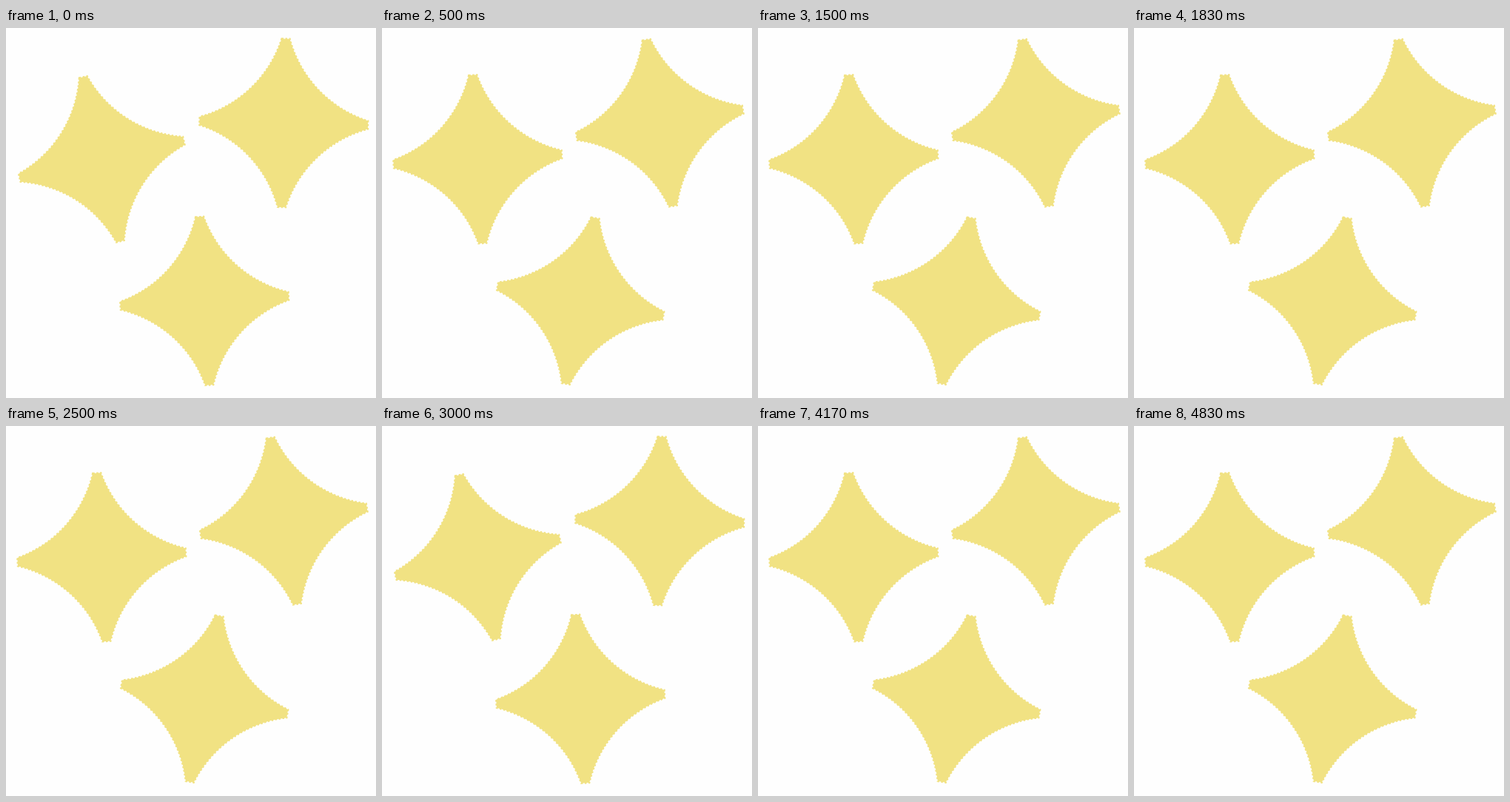
Animation of 500x500 px, one loop 5.01 s. Source, as an HTML page:

```html
<!DOCTYPE html>
<html lang="en">
<head>
<meta charset="utf-8">
<title>Sparkles</title>
<style>
  html, body { margin: 0; width: 100%; height: 100%; overflow: hidden; background: #fefefe; }
  svg { display: block; width: 100%; height: 100%; }
  /* the dashed stroke gives the edge its fine teeth */
  use { fill: #f1e283; stroke: #f1e283; stroke-width: 2.4; stroke-dasharray: 2.5; transform: rotate(var(--a)); }
  .tilt use { transform: rotate(var(--b)); }
</style>
</head>
<body>
<svg id="stage" viewBox="0 0 500 500">
  <defs>
    <!-- four concave arcs joined by short flat tips -->
    <path id="star" d="M-5.5-113.8H5.5A160 160 0 0 0 113.8-5.5V5.5A160 160 0 0 0 5.5 113.8H-5.5A160 160 0 0 0-113.8 5.5V-5.5A160 160 0 0 0-5.5-113.8Z"/>
  </defs>
  <g transform="translate(129.3 177.3)"><use href="#star" style="--a:-12.7deg;--b:-3.3deg"/></g>
  <g transform="translate(375.3 128.3)"><use href="#star" style="--a:1.4deg;--b:-9.1deg"/></g>
  <g transform="translate(268.2 368.8)"><use href="#star" style="--a:-3.3deg;--b:10.1deg"/></g>
</svg>
<script>
  const LOOP = 5010, POSES = 30, RATE = 6 / 1000;
  const stage = document.getElementById('stage');
  const start = performance.now();

  // The pose flips six times a second, on a 10 ms clock.
  function draw() {
    const t = (performance.now() - start) % LOOP;
    const tick = Math.floor(t / 10) * 10;
    const pose = Math.min(POSES - 1, Math.floor((tick + 4) * RATE));
    stage.classList.toggle('tilt', pose % 2 === 1);
    requestAnimationFrame(draw);
  }
  draw();
</script>
</body>
</html>
```
